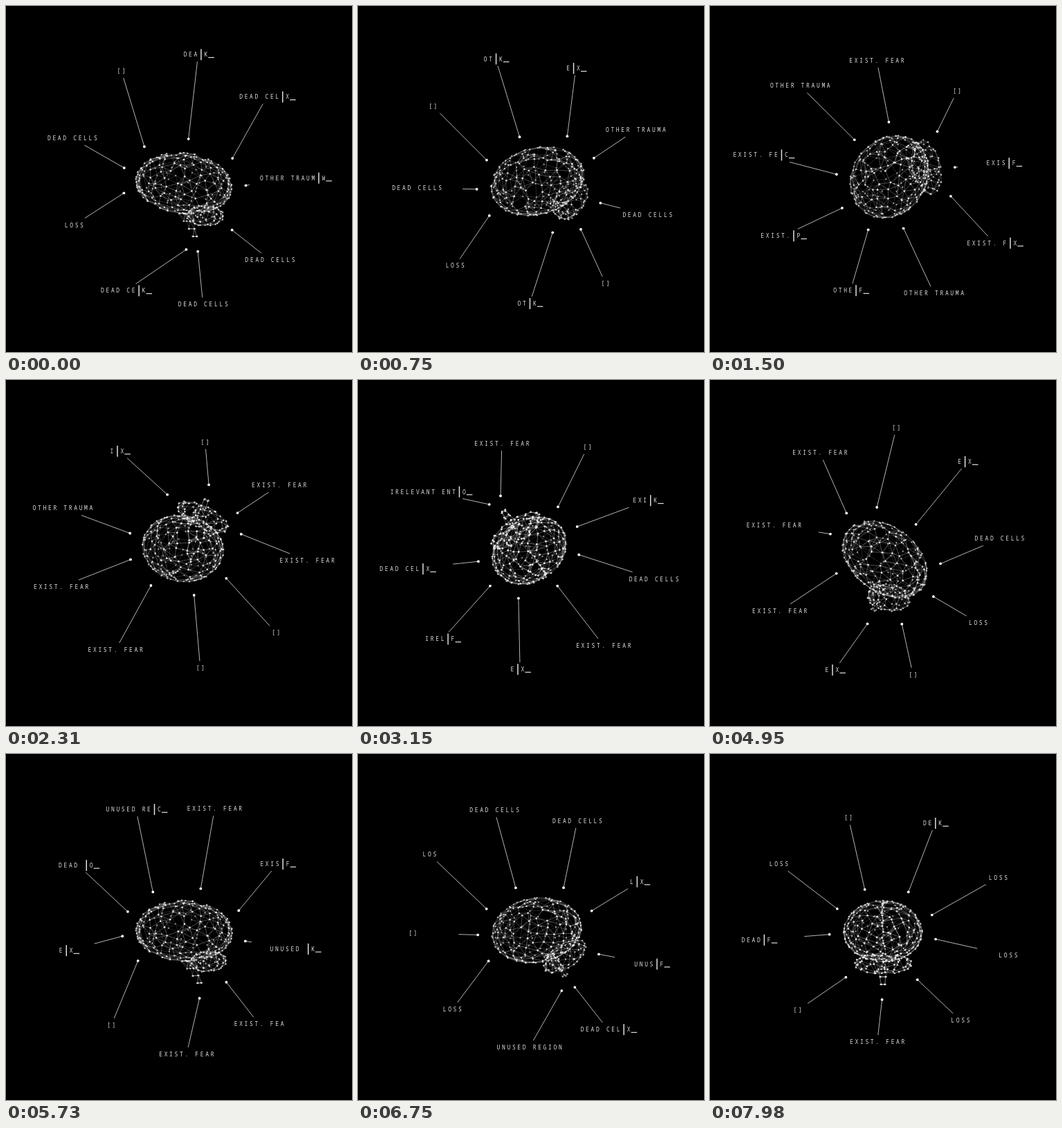
These frames come from a looping animation (500 px wide and 500 px high, 8000 ms). An HTML page with a canvas:

```html
<!DOCTYPE html>
<html lang="en">
<head>
<meta charset="utf-8">
<title>Brain network</title>
<style>
  html, body { margin: 0; width: 100%; height: 100%; overflow: hidden; background: #000; }
  canvas { display: block; width: 500px; height: 500px; }
</style>
</head>
<body>
<canvas id="stage"></canvas>
<script>
const LOOP = 8;
const TAU = Math.PI * 2;
const rad = deg => deg * Math.PI / 180;
const canvas = document.getElementById('stage');
const ctx = canvas.getContext('2d');
const ratio = window.devicePixelRatio || 1;
canvas.width = canvas.height = 500 * ratio;
ctx.scale(ratio, ratio);

let seed = 4821;
const random = () => (seed = seed * 16807 % 2147483647) / 2147483647;
const jitter = size => (random() - 0.5) * size;

// --- Brain model: coordinates are [front, down, side] around the pivot ---
const nodes = [], edges = [];

function spherePoints(count) {
  return Array.from({ length: count }, (_, i) => {
    const y = Math.max(-1, Math.min(1, 1 - (i + 0.5) * 2 / count + jitter(0.12)));
    const a = i * 2.39996 + jitter(0.22), r = Math.sqrt(1 - y * y);
    return [r * Math.cos(a), y, r * Math.sin(a)];
  });
}

// Adds a part and joins every node to its nearest neighbours.
function addPart(points, links) {
  const start = nodes.length;
  nodes.push(...points);
  const seen = new Set();
  points.forEach((p, i) => {
    points
      .map((q, j) => [Math.hypot(p[0] - q[0], p[1] - q[1], p[2] - q[2]), j])
      .sort((a, b) => a[0] - b[0])
      .slice(1, links + 1)
      .forEach(([, j]) => {
        const key = Math.min(i, j) + '-' + Math.max(i, j);
        if (!seen.has(key)) edges.push([start + i, start + j]);
        seen.add(key);
      });
  });
}

// Cerebrum, with the fissure between its halves as an extra arc of nodes
const cerebrum = spherePoints(225).map(([f, d, s]) =>
  [-7 + 70 * f, 8 + (d > 0 ? 42 : 46) * d - 5 * f, 57 * s]);
const fissure = Array.from({ length: 20 }, (_, i) => {
  const a = -0.4 + i * 0.2;
  return [-7 + 65 * Math.cos(a), 8 - 42 * Math.sin(a) - 5 * Math.cos(a), jitter(3)];
});
addPart([...cerebrum, ...fissure], 5);

// Cerebellum
addPart(spherePoints(60).map(([f, d, s]) => [-38 + 27 * f, 53 + 15 * d, 42 * s]), 4);

// Stem
addPart(Array.from({ length: 16 }, (_, i) => {
  const u = Math.floor(i / 4) / 3, a = (i % 4) * TAU / 4 + u, r = 9 - 5 * u;
  return [-9 - 14 * u + r * Math.cos(a), 50 + 33 * u, r * Math.sin(a)];
}), 4);

// --- Orientation: time, front axis, down axis ---
const poses = [
  [0,    [-1, 0, 0],         [0, 1, 0]],
  [1.5,  [-.55, .45, .7],    [.78, 0, .62]],
  [3.15, [-.17, -.25, .95],  [-.52, -.79, -.3]],
  [4.2,  [-.05, -.8, .6],    [-.65, .45, .61]],
  [5.73, [-1, .08, 0],       [.12, 1, 0]],
  [6.75, [-.75, .1, .64],    [.25, .85, .4]],
  [7.98, [0, 0, 1],          [0, 1, 0]]
];
const dot = (a, b) => a[0] * b[0] + a[1] * b[1] + a[2] * b[2];
const unit = v => v.map(c => c / Math.hypot(...v));
const mix = (a, b, u) => a.map((c, i) => c + (b[i] - c) * u);

function axesAt(t) {
  let i = 0;
  while (i < poses.length - 2 && t >= poses[i + 1][0]) i++;
  const [t0, f0, d0] = poses[i], [t1, f1, d1] = poses[i + 1];
  const u = Math.min(1, (t - t0) / (t1 - t0));
  const f = unit(mix(f0, f1, u));
  const rough = mix(d0, d1, u), along = dot(rough, f);
  const d = unit(rough.map((c, k) => c - along * f[k]));
  const s = [f[1] * d[2] - f[2] * d[1], f[2] * d[0] - f[0] * d[2], f[0] * d[1] - f[1] * d[0]];
  return [f, d, s];
}

function project(t) {
  const [f, d, s] = axesAt(t);
  const place = p => [0, 1, 2].map(k => (k < 2 ? 250 : 0) + p[0] * f[k] + p[1] * d[k] + p[2] * s[k]);
  return { points: nodes.map(place), center: place([-7, 8, 0]) };
}

const nearness = z => Math.max(0, Math.min(1, 0.5 - z / 130));

function disc(x, y, r, color) {
  ctx.fillStyle = color;
  ctx.beginPath();
  ctx.arc(x, y, r, 0, TAU);
  ctx.fill();
}

function line(x1, y1, x2, y2, width, color) {
  ctx.lineWidth = width;
  ctx.strokeStyle = color;
  ctx.beginPath();
  ctx.moveTo(x1, y1);
  ctx.lineTo(x2, y2);
  ctx.stroke();
}

function drawBrain(points) {
  for (const [i, j] of edges) {
    const a = points[i], b = points[j];
    const alpha = 0.25 + 0.4 * nearness((a[2] + b[2]) / 2);
    line(a[0], a[1], b[0], b[1], 0.6, `rgba(205,205,205,${alpha})`);
  }
  for (const [x, y, z] of points) {
    const near = nearness(z);
    disc(x, y, 1 + 0.4 * near, `rgba(240,240,240,${0.55 + 0.4 * near})`);
  }
}

// --- Callout text ---
const phrases = {
  D: 'DEAD CELLS', E: 'EXIST. FEAR', L: 'LOSS',
  O: 'OTHER TRAUMA', U: 'UNUSED REGION', I: 'IRELEVANT ENTRY'
};
const GLYPHS = 'KXKKFOPKXCFWXOK';
const STEP = 0.07, PAUSE = 0.2;

// Each entry: phrase and letters typed at the matching pose time (none = complete).
const scripts = [
  'D3 O D8 E3 E D8 L',
  'D8 E I13 E8 U-1 U L',
  'O11 E-1 E E10 E1 L E',
  'D E4 D-1 E D5 E-1 D-1',
  'D E8 E3 L U9 L3 D4',
  'D7 O D E7 E D L',
  'L O4 E D E4 D D-1',
  'D E6 E1 L U7 L1 D2',
  'E-1 E9 I4 E-1 E10 U4 L'
].map(script => script.split(' ').map((entry, i) => {
  const text = phrases[entry[0]];
  const typed = entry.length > 1 ? +entry.slice(1) : text.length + 1;
  return { text, start: poses[i][0] - (typed + 0.5) * STEP };
}));

function textAt(script, t) {
  const { text, start } = script.filter((p, i) => !i || t >= p.start - PAUSE).pop();
  const typed = Math.floor((t - start) / STEP);
  if (typed < 1) return { text: '[]' };
  const shown = text.slice(0, typed);
  const last = text.length < 12 ? text.length - 1 : text.length;
  if (typed >= last) return { text: shown };
  return { text: `${shown} ${GLYPHS[typed]} `, bar: typed };
}

function drawLabel({ text, bar }, x, y) {
  const advance = ctx.measureText('M').width;
  const left = x - (text.length * advance - 2.65) / 2;
  ctx.fillStyle = '#e0e0e0';
  ctx.fillText(text, left, y + 3);
  if (bar) {
    ctx.fillRect(left + (bar + 0.3) * advance, y - 8, 1.5, 16);
    ctx.fillRect(left + (bar + 1.8) * advance, y + 3.6, 8.5, 1.2);
  }
}

// Point just outside the outline, facing the given direction.
function outlinePoint(points, dx, dy) {
  const reach = points.map(p => p[0] * dx + p[1] * dy);
  const max = Math.max(...reach);
  let x = 0, y = 0, total = 0;
  points.forEach((p, i) => {
    const w = Math.exp((reach[i] - max) / 1.8);
    x += p[0] * w;
    y += p[1] * w;
    total += w;
  });
  return [x / total + dx * 22, y / total + dy * 22];
}

function drawCallout(k, t, points, center) {
  const spin = -33.25 * t;
  const ring = rad(-81 + spin + 40 * k), drift = rad(-103 + spin - 40 * k);
  const x = 252.5 + 174.4 * Math.cos(ring) + 9 * Math.cos(drift);
  const y = 251.3 + 174.4 * Math.sin(ring) + 9 * Math.sin(drift);
  const length = Math.hypot(x - center[0], y - center[1]);
  const [px, py] = outlinePoint(points, (x - center[0]) / length, (y - center[1]) / length);

  // The leader stops at the edge of the label's box.
  const dx = x - px, dy = y - py;
  const u = Math.max(0, 1 - Math.min(66 / Math.abs(dx), 10 / Math.abs(dy)));
  line(px, py, px + dx * u, py + dy * u, 1, '#b4b4b4');
  disc(px, py, 1.9, '#fff');
  drawLabel(textAt(scripts[k], t), x, y);
}

function draw() {
  const t = performance.now() / 1000 % LOOP;
  ctx.fillStyle = '#000';
  ctx.fillRect(0, 0, 500, 500);
  ctx.font = '8px "Noto Sans Mono", "DejaVu Sans Mono", monospace';
  ctx.letterSpacing = '2.65px';
  const { points, center } = project(t);
  drawBrain(points);
  scripts.forEach((_, k) => drawCallout(k, t, points, center));
  requestAnimationFrame(draw);
}
draw();
</script>
</body>
</html>
```
